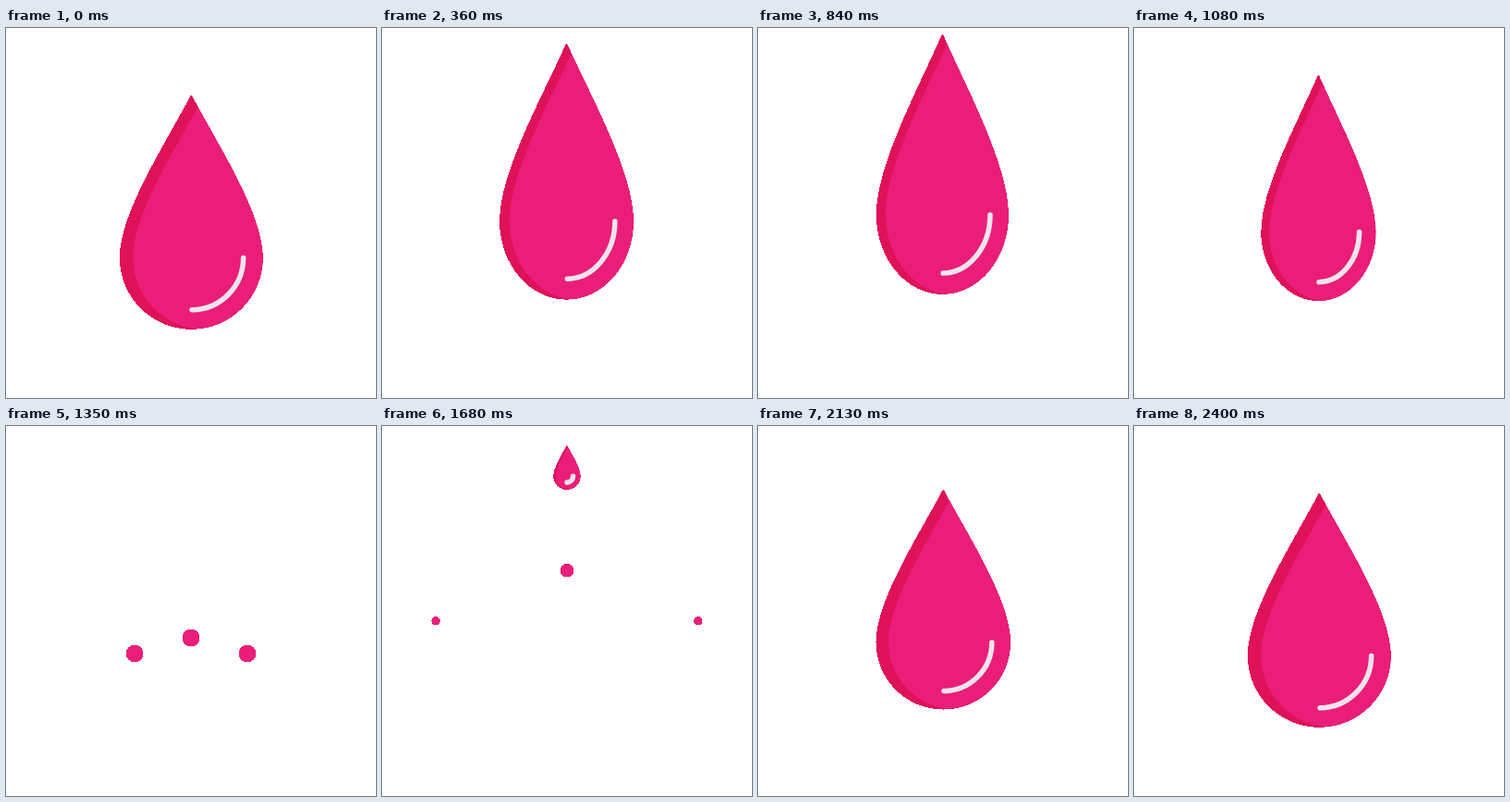
These frames come from a looping animation (400 px wide and 400 px high, 2.49 s). An HTML page:

```html
<!DOCTYPE html>
<html lang="en">
<head>
<meta charset="utf-8">
<title>Bouncing drop</title>
<style>
  html, body { margin: 0; width: 100%; height: 100%; overflow: hidden; background: #fff; }
  svg { display: block; width: 100%; height: 100%; }
</style>
</head>
<body>
<svg viewBox="0 0 400 400">
  <defs>
    <!-- tip at the origin -->
    <path id="shape" d="M0 0Q.8 0 1.5 1.6C28 52 77.5 127 77.5 175.3A77.5 77.5 0 0 1 -77.5 175.3C-77.5 127 -28 52 -1.5 1.6Q-.8 0 0 0Z"/>
    <clipPath id="inside"><use href="#shape"/></clipPath>
  </defs>
  <g id="dots" fill="#ea1e79" shape-rendering="crispEdges">
    <circle/><circle/><circle/>
  </g>
  <g id="drop">
    <g id="body">
      <use href="#shape" fill="#df1159" shape-rendering="crispEdges"/>
      <g clip-path="url(#inside)"><use id="face" href="#shape" fill="#ea1e79"/></g>
    </g>
    <path id="shine" fill="none" stroke="#f0e4ec" stroke-width="5.5" stroke-linecap="round"/>
  </g>
</svg>
<script>
  const LOOP = 2490, STEP = 30;
  const FLOOR = 343, CEILING = 8.5, TIP = 73;
  const COLLAPSE = 960, BURST = 1200, REGROW = 1620, SETTLED = 2400;
  const GRAVITY = 0.001124;

  const [drop, body, face, shine] = ['drop', 'body', 'face', 'shine']
    .map(id => document.getElementById(id));
  const circles = document.querySelectorAll('#dots circle');

  // side: horizontal direction, rise: launch speed in px/ms, life in ms
  const particles = [
    { side: -1, rise: 0.815, life: 600 },
    { side: 0, rise: 0.9286, life: 780 },
    { side: 1, rise: 0.815, life: 600 }
  ];

  const progress = (t, from, to) => Math.min(1, Math.max(0, (t - from) / (to - from)));
  const mix = (a, b, u) => a + (b - a) * u;
  const easeOut = (u, p) => 1 - Math.pow(1 - u, p);

  function placeDrop(x, tip, sx, sy, rim) {
    const visible = sx > 0.01;
    drop.setAttribute('visibility', visible ? 'visible' : 'hidden');
    if (!visible) return;
    drop.setAttribute('transform', `translate(${x} ${tip})`);
    body.setAttribute('transform', `scale(${sx} ${sy})`);
    face.setAttribute('x', rim);
    // the shine keeps its line weight and part of its inset at any size
    const rx = Math.max(0, 61.3 * sx - 5), ry = Math.max(0, 61.3 * sy - 5);
    const y = 175.5 * sy;
    shine.setAttribute('d', `M${rx} ${y}A${rx} ${ry} 0 0 1 ${0.8 * sx} ${y + ry}`);
    shine.setAttribute('visibility', rx > 0 ? 'inherit' : 'hidden');
  }

  function drawDrop(t) {
    if (t < REGROW) {
      // leap with a stretch, then shrink towards the floor
      const e = easeOut(progress(t, 0, 960), 4);
      const k = 1 - Math.pow(progress(t, COLLAPSE, BURST), 2.93);
      const tip = mix(TIP, 7, e);
      placeDrop(mix(200.3, 199.4, e), mix(FLOOR, tip, k),
        mix(1, 0.923, e) * k, mix(1, 1.111, e) * k, mix(14.5, 11, e));
    } else {
      const s = easeOut(progress(t, REGROW, SETTLED), 2.64);
      placeDrop(mix(199.8, 200.3, s), mix(CEILING, TIP, s), s, s, 14.5);
    }
  }

  function drawParticle({ side, rise, life }, circle, t) {
    const age = t - BURST;
    const u = age / life;
    const alive = u > 0 && u < 1;
    circle.setAttribute('r', alive ? 9.6 * (1 - u ** 3) : 0);
    if (!alive) return;
    circle.setAttribute('cx', 200 + side * 150 * easeOut(u, 1.81));
    circle.setAttribute('cy', FLOOR - rise * age + GRAVITY * age * age);
  }

  function draw(t) {
    drawDrop(t);
    particles.forEach((p, i) => drawParticle(p, circles[i], t));
  }

  const start = performance.now();
  function frame() {
    const t = (performance.now() - start) % LOOP;
    draw(Math.floor(t / STEP) * STEP);
    requestAnimationFrame(frame);
  }
  frame();
</script>
</body>
</html>
```
